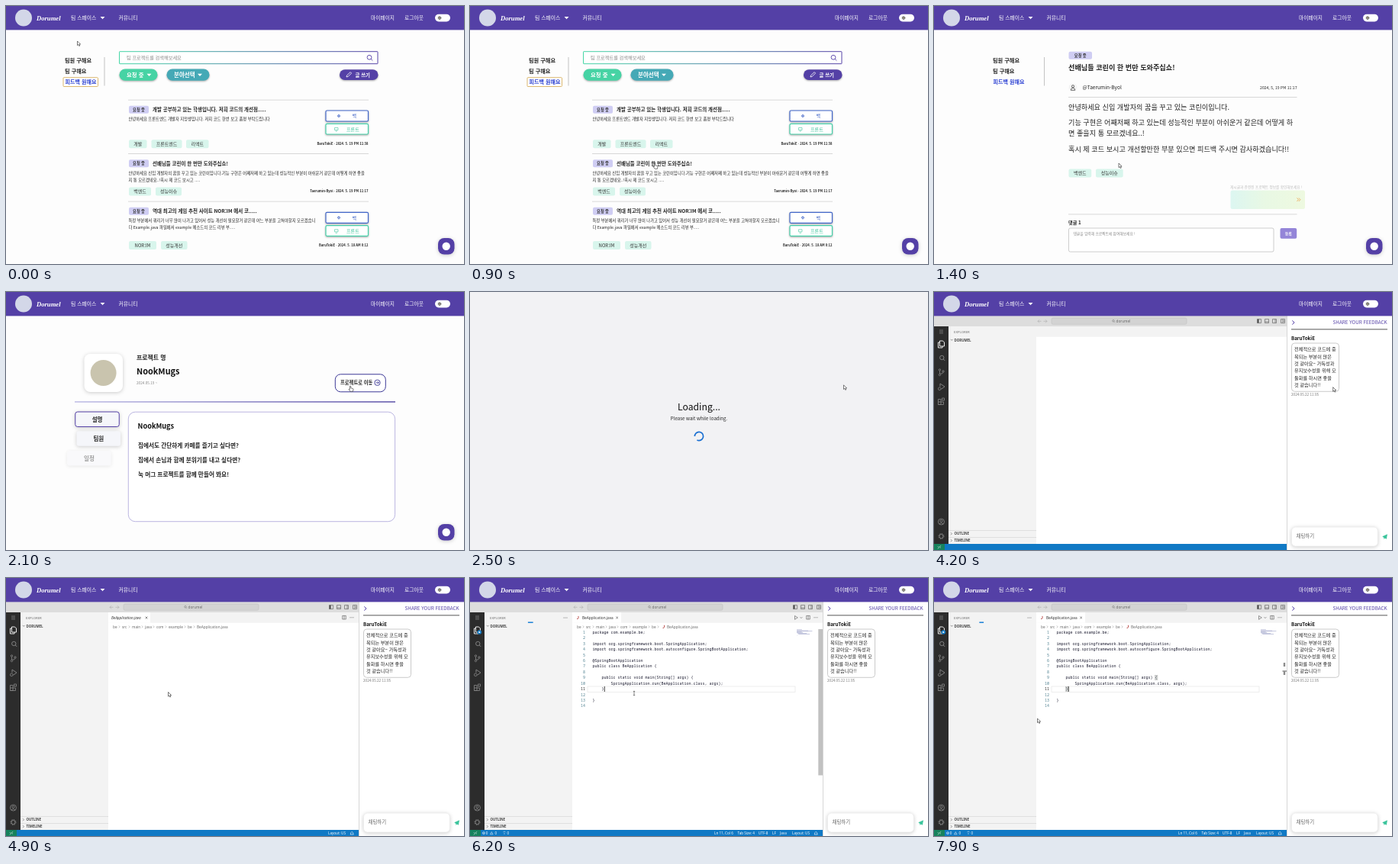
These frames come from a looping animation (600 by 338 pixels, 8 s). An HTML page:

```html
<!DOCTYPE html>
<html lang="ko">
<head>
<meta charset="utf-8">
<title>Dorumel</title>
<style>
html, body { margin: 0; width: 100%; height: 100%; overflow: hidden; background: #fff; }
svg { display: block; width: 100vw; height: 100vh; font-family: "Noto Sans CJK KR", "Noto Sans CJK", "Noto Sans", sans-serif; }
text { white-space: pre; }
.b { font-weight: 700; }
.e { text-anchor: end; }
.c { text-anchor: middle; }
.ui { font-family: "Noto Sans", "Noto Sans CJK KR", sans-serif; }
.code { font-family: "Noto Sans Mono", "DejaVu Sans Mono", monospace; }
.mark { font: italic 700 8.6px "Liberation Serif", serif; }
.sh { filter: drop-shadow(.7px 1.2px .9px #0005); }
.soft { filter: drop-shadow(0 1.5px 2.5px #0003); }
</style>
</head>
<body>
<svg viewBox="0 0 600 338" preserveAspectRatio="none">
  <defs>
    <linearGradient id="search"><stop stop-color="#45d6a6"/><stop offset="1" stop-color="#5440a6"/></linearGradient>
    <linearGradient id="rule" gradientUnits="userSpaceOnUse" x1="90" x2="510"><stop stop-color="#b4b2e2"/><stop offset="1" stop-color="#43379b"/></linearGradient>
    <linearGradient id="card"><stop stop-color="#dcf6f1"/><stop offset=".45" stop-color="#e8f8e4"/><stop offset="1" stop-color="#eef9e0"/></linearGradient>
  </defs>
  <g id="stage"></g>
</svg>
<script>
const PURPLE = '#5440a6', INK = '#222', LOOP = 8000;
const $ = id => document.getElementById(id);

// drawing helpers
const box = (x, y, w, h, fill, more = '') => `<rect x="${x}" y="${y}" width="${w}" height="${h}" fill="${fill}" ${more}/>`;
const frame = (x, y, w, h, r, stroke, width = 1, fill = '#fff', more = '') =>
  box(x, y, w, h, fill, `rx="${r}" stroke="${stroke}" stroke-width="${width}" ${more}`);
const text = (x, y, size, str, fill = INK, cls = '') =>
  `<text x="${x}" y="${y}" font-size="${size}" fill="${fill}" class="${cls}">${str}</text>`;
const path = (d, stroke, width = .7, fill = 'none', more = '') =>
  `<path d="${d}" stroke="${stroke}" stroke-width="${width}" fill="${fill}" ${more}/>`;
const dot = (x, y, r, fill, stroke = 'none', width = 1) =>
  `<circle cx="${x}" cy="${y}" r="${r}" fill="${fill}" stroke="${stroke}" stroke-width="${width}"/>`;
const group = (id, body, more = '') => `<g id="${id}" ${more}>${body}</g>`;
const caret = (x, y, w = 6) => path(`M${x} ${y}h${w}l${-w / 2} 3.2z`, 'none', 0, '#fff');
const lens = (x, y, r, color, w = .7) => dot(x, y, r, 'none', color, w) + path(`M${x + r * .7} ${y + r * .7}l${r * .8} ${r * .8}`, color, w);
const gear = (x, y, r, color, w) => dot(x, y, r, 'none', color, w) +
  `<circle cx="${x}" cy="${y}" r="${r * 1.35}" fill="none" stroke="${color}" stroke-width="${w}" stroke-dasharray="${r * .53}"/>`;

const header = box(0, 0, 600, 31.4, PURPLE) + dot(23, 15.5, 11, '#d3d7e8') +
  '<text x="40" y="19" class="mark" fill="#fff">Dorumel</text>' +
  text(85, 18, 6.85, '팀 스페이스', '#fff') + caret(123.5, 14, 6) +
  text(147.5, 18, 6.8, '커뮤니티', '#fff') + text(478, 18, 6.75, '마이페이지', '#fff') +
  text(522, 18, 6.8, '로그아웃', '#fff') +
  box(562, 10.8, 20, 9.6, '#fff', 'rx="4.8"') + gear(568, 15.6, 1.5, '#444', .8) + dot(568, 15.6, 1, '#8a8160');

const chatButton = box(566, 304, 21.5, 21.5, PURPLE, 'rx="8" class="soft"') + dot(576.7, 314.7, 5.2, '#fff');

const side = (lineX, extra) => text(77, 74, 7.2, '팀원 구해요', INK, 'b') + text(77, 88, 7.2, '팀 구해요', INK, 'b') +
  extra + text(77.5, 102, 7.05, '피드백 원해요', '#2a3fd2', 'b') + box(lineX, 67, .8, 37.5, '#b4b4b4');

const badge = (x, y, w) => box(x, y, w, 10, '#cfcdf3', 'rx="2"') + text(x + w / 2, y + 6.9, 5.2, '요청 중', '#333', 'c b');
const tag = (x, y, w, str) => box(x, y, w, 11, '#d8f5ec', 'rx="2"') + text(x + w / 2, y + 7.6, 6, str, '#333', 'c');
const pill = (x, y, w, h, color) => box(x, y, w, h, color, `rx="${h / 2}" class="sh"`);

const roles = y => frame(419, y, 55.5, 14, 1.5, '#4166c9', 1.2, '#fff', 'class="sh"') +
  gear(436, y + 7, 1.2, '#3a5fc4', .8) + text(453.5, y + 9.3, 6, '백', '#3a5fc4') +
  frame(419, y + 17.4, 55.5, 13.6, 1.5, '#45cfa8', 1.2, '#fff', 'class="sh"') +
  path(`M430.5 ${y + 22.5}h4.5v3h-4.5zM431.5 ${y + 27}h2.5`, '#3cc49c', .6) + text(446, y + 26.5, 6.1, '프론트', '#3cc49c');

const post = (y, title, body, tagY, tags, by) => box(160, y - 13, 315, .8, '#cfcfcf') + badge(161, y - 5, 26) +
  text(192, y + 2.4, 6.48, title, INK, 'b') +
  body.map((s, i) => text(160.5, y + 14.6 + i * 8.7, 5.3, s)).join('') +
  tags.map(([x, w, s]) => tag(x, tagY, w, s)).join('') + text(474.5, tagY + 6.6, 4.2, by, INK, 'e b');

const listPage = side(128.6, frame(75, 93.7, 45.5, 11.8, 1, '#d8b060', .9)) +
  frame(148.5, 59.7, 338.5, 16, .5, 'url(#search)') + text(158, 70.2, 6.2, '팀 프로젝트를 검색해보세요', '#8a8a8a') +
  lens(476, 67.3, 2.9, PURPLE, .9) +
  pill(148.5, 82.5, 50, 15.3, '#46d3a4') + text(158, 92.8, 7.4, '요청 중', '#fff', 'b') + caret(184.5, 88.7) +
  pill(210.5, 82.5, 56, 15.3, '#45a9b6') + text(220, 92.8, 7.5, '분야선택', '#fff', 'b') + caret(251, 88.7) +
  pill(437, 83.3, 50.5, 13.8, PURPLE) + text(457.5, 92.5, 6.4, '글 쓰기', '#fff', 'b') +
  path('M446 93l.6-2.2 4.6-4.2 1.5 1.5-4.6 4.3z', '#fff', .8) +
  post(135.7, '개발 공부하고 있는 학생입니다. 저희 코드의 개선점.....',
    ['안녕하세요 프론트엔드 개발자 지망생입니다. 저희 코드 한번 보고 품평 부탁드립니다'],
    175.3, [[161, 23.5, '개발'], [190.5, 40, '프론트엔드'], [236, 29.5, '리액트']], 'BaruTokiE · 2024. 5. 19 PM 11:38') +
  roles(137) +
  post(206.2, '선배님들 코린이 한 번만 도와주십쇼!',
    ['안녕하세요 신입 개발자의 꿈을 꾸고 있는 코린이입니다.기능 구현은 어째저째 하고 있는데 성능적인 부분이 아쉬운거 같은데 어떻게 하면 좋을',
     '지 통 모르겠네요..!혹시 제 코드 보시고 .....'],
    237.6, [[161, 29, '백엔드'], [196, 34, '성능이슈']], 'Taerumin-Byol · 2024. 5. 19 PM 11:17') +
  post(268.7, '역대 최고의 게임 추천 사이트 NOR:IM 에서 코.....',
    ['특정 부분에서 쿼리가 너무 많이 나가고 있어서 성능 개선이 필요할거 같은데 어느 부분을 고쳐야할지 모르겠습니',
     '다 Example.java 파일에서 example 메소드의 코드 리뷰 부.....'],
    308, [[161, 36, 'NOR:IM'], [203, 34.5, '성능개선']], 'BaruTokiE · 2024. 5. 18 AM 0:12') +
  roles(270.3);

const detailPage = side(144, '') + badge(176.5, 59.7, 30.5) +
  text(176, 83.7, 9.15, '선배님들 코린이 한 번만 도와주십쇼!', INK, 'b') +
  dot(182, 107, 5.5, '#f4f4f4') + dot(182, 105.3, 1.6, 'none', '#333', .7) + path('M179.3 110.3c0-4 5.4-4 5.4 0z', '#333') +
  text(194.5, 109.2, 6.6, '@Taerumin-Byol') + text(475.5, 108.7, 5.1, '2024, 5, 19 PM 11:17', INK, 'e') +
  box(176, 119, 299.5, .8, '#cfcfcf') +
  text(176, 135.8, 9.15, '안녕하세요 신입 개발자의 꿈을 꾸고 있는 코린이입니다.') +
  text(176, 156.3, 9.15, '기능 구현은 어째저째 하고 있는데 성능적인 부분이 아쉬운거 같은데 어떻게 하') +
  text(176, 170.3, 9.15, '면 좋을지 통 모르겠네요..!') +
  text(176, 190.8, 9.15, '혹시 제 코드 보시고 개선할만한 부분 있으면 피드백 주시면 감사하겠습니다!!') +
  tag(176.5, 213.4, 29.7, '백엔드') + tag(212, 213.4, 35.7, '성능이슈') +
  text(388, 238.8, 4.7, '게시글과 관련된 프로젝트 정보를 확인해보세요 !', '#bdbdbd') +
  box(388.5, 241.5, 97.5, 24.5, 'url(#card)', 'rx="2.5"') + path('M475.5 251.5l2 2.2-2 2.2m2.4-4.4l2 2.2-2 2.2', '#eaa04a', .8) +
  box(176, 272.5, 299.5, .8, '#cfcfcf') + text(176, 286.2, 6.2, '댓글 1', INK, 'b') +
  frame(176.5, 291, 268.5, 31, 2, '#b8b8b8', .7) + text(182.5, 299.6, 4.75, '댓글을 입력해 프로젝트에 참여해보세요 !', '#888') +
  box(453.5, 291, 21.7, 13.7, '#9485d8', 'rx="2"') + text(464.3, 299.7, 5, '등록', '#fff', 'c b');

const tabs = [[90.5, 157, '설명'], [90.5, 182.3, '팀원'], [90.5, 208, '일정']].map(([x, y, s], i) =>
  group('tab' + i, frame(x, y, 57.5, 19.5, 3, i ? 'none' : PURPLE, 1, '#f5f6fa', 'class="soft"') +
    text(x + 28.8, y + 12.6, 7.5, s, INK, 'c b'))).join('');

const projectPage = frame(102.5, 81, 50.5, 50, 8, 'none', 0, '#fff', 'class="soft"') + dot(127.6, 106, 17, '#c9c4ae') +
  text(171, 89.3, 7.9, '프로젝트 명', INK, 'b') + text(171, 108.2, 10.9, 'NookMugs', '#111', 'b') +
  text(171, 121.2, 4.7, '2024.05.19 ~', '#888') +
  frame(431.3, 107.8, 66, 23, 7, '#3b3796', 1) + text(438, 121.4, 6.3, '프로젝트로 이동', INK, 'b') +
  dot(486.5, 118.8, 3.7, 'none', '#3b3796', .9) + path('M484.5 118.8h4m-1.7-1.7l1.7 1.7-1.7 1.7', '#3b3796', .8) +
  box(90, 143.3, 420, 1.3, 'url(#rule)') + tabs +
  frame(160.3, 157.2, 349.3, 143.5, 9, '#aaa4da', .8) + text(172.5, 179.3, 9.2, 'NookMugs', '#111', 'b') +
  ['집에서도 간단하게 카페를 즐기고 싶다면?', '집에서 손님과 함께 분위기를 내고 싶다면?', '눅 머그 프로젝트를 함께 만들어 봐요!']
    .map((s, i) => text(173, 204 + i * 18.8, 7.65, s, INK, 'b')).join('');

const loadingPage = box(0, 0, 600, 338, '#f2f2f4') + text(300, 155, 12.2, 'Loading...', '#111', 'c') +
  text(300, 168, 6.1, 'Please wait while loading.', INK, 'c') +
  group('spinner', '<circle r="5.6" fill="none" stroke="#1b70d2" stroke-width="1.7" stroke-dasharray="28.5 6.7"/>');

// editor
const GRAY = '#6b6b6b', DIM = '#8a8a8a';
const ui = (x, y, size, str, fill = GRAY, cls = '') => text(x, y, size, str, fill, 'ui ' + cls);
const crumbs = (x, icon) => [[140, 'be'], [152, 'src'], [165, 'main'], [182, 'java'], [197, 'com'], [213, 'example'], [238, 'be']]
  .map(([cx, s], i, all) => ui(cx, 65.6, 4.74, s) + path(`M${(all[i + 1] || [250])[0] - 4.2} 62.4l1.4 1.5-1.4 1.5`, DIM, .5)).join('') +
  (icon ? javaIcon(252, 65.6) : '') + ui(x, 65.6, 4.74, 'BeApplication.java');
const javaIcon = (x, y) => path(`M${x + 2.5} ${y - 3.8}v2.6q0 1.2-2 1`, '#b5423f', .9);
const cross = (x, y) => path(`M${x - 1.4} ${y - 1.4}l2.8 2.8m0-2.8l-2.8 2.8`, '#444', .6);
const section = (y, s) => box(19, y, 115, .6, '#d2d2d2') + path(`M22 ${y + 2.9}l1.5 1.5-1.5 1.5`, '#555', .6) + ui(26.5, y + 6.1, 4.4, s, '#444', 'b');
const layoutIcon = (x, part) => path(`M${x - 2.5} 35.6h5v5h-5z`, '#555', .6) + part;

const shell = box(0, 31, 462, 307, '#fff') + box(0, 31, 462, 14, '#dddddd') +
  path('M138 36.3l-2 2 2 2m-2-2h4.5M146 36.3l2 2-2 2m2-2h-4.5', '#aaa', .6) +
  frame(154, 34, 177, 8.3, 2, '#c2c2c2', .6, '#d3d3d3') + lens(235, 37.8, 1.3, GRAY, .5) + ui(238.5, 40.2, 4.7, 'dorumel') +
  layoutIcon(426, box(423.5, 35.6, 2.2, 5, '#555')) + layoutIcon(436, path('M433.5 39h5', '#555', .6)) +
  layoutIcon(446, path('M447 35.6v5', '#555', .6)) + layoutIcon(457, path('M457 35.6v5m0-2.5h2.5', '#555', .6)) +
  box(0, 45, 19, 285, '#2c2c2c') + path('M7 50h5m-5 2h5m-5 2h5', '#999', .6) +
  path('M7.5 64h4l2 2v5h-6zM7.5 66h-2v7h5.5v-2', '#fff', .9) + lens(10.3, 86, 2.7, DIM, .9) +
  dot(7.5, 102, 1.2, 'none', DIM, .8) + dot(7.5, 108.5, 1.2, 'none', DIM, .8) + dot(12, 104, 1.2, 'none', DIM, .8) +
  path('M7.5 103.2v4m4.5-2q0 2-4 2', DIM, .8) +
  path('M8 124v-4l6 4-4.5 3.2', DIM, .9) + dot(7.3, 126.8, 1.8, 'none', DIM, .8) +
  path('M5.5 140.5h3.5v7h-3.5zM5.5 144h7v3.5h-7M10.5 139h3v3h-3z', DIM, .8) +
  dot(9.5, 301, 4, 'none', DIM, .8) + dot(9.5, 300, 1.5, 'none', DIM, .8) + path('M7 304q2.5-3 5 0', DIM, .8) + gear(9.5, 320, 2.6, DIM, .9) +
  box(19, 45, 115, 285, '#f3f3f3') + ui(26, 53.6, 4.3, 'EXPLORER') +
  path('M21.8 61.9l1.5 1.5 1.5-1.5', '#555', .6) + ui(26.5, 65, 4.4, 'DORUMEL', '#444', 'b') +
  section(312.3, 'OUTLINE') + section(321.2, 'TIMELINE') + box(134, 45, 328, 13.7, '#f3f3f3') +
  box(0, 330, 462, 8, '#1079c5') + box(0, 330, 14, 8, '#16825d') + path('M5 333.2l1.6 1.6-1.6 1.6m4-4.2l-1.6 1.6 1.6 1.6', '#fff', .6);

const tools = path('M440.7 49.4h4.6v4.6h-4.6zM443 49.4v4.6', '#555', .6) + [451, 453, 455].map(x => dot(x, 51.8, .5, '#555')).join('');
const layoutStatus = ui(422, 335.9, 4.6, 'Layout: US', '#fff') + path('M451 336h4.4l-.7-1v-1.2q-1.5-3-3 0v1.2z', '#fff', .6);

const preview = box(134, 45, 55, 13.7, '#fff') +
  `<g font-style="italic">${ui(138, 53.7, 4.74, 'BeApplication.java', '#333')}</g>` + cross(184, 52) + crumbs(250, false);

const lineY = n => 72.9 + (n - 1) * 7.42;
const source = { 1: 'package com.example.be;', 3: 'import org.springframework.boot.SpringApplication;',
  4: 'import org.springframework.boot.autoconfigure.SpringBootApplication;', 6: '@SpringBootApplication',
  7: 'public class BeApplication {', 9: '    public static void main(String[] args) {',
  10: '        SpringApplication.run(BeApplication.class, args);', 11: '    }', 13: '}' };
const codeText = (x, y, s, fill, cls = '') => text(x, y, 5, s, fill, 'code ' + cls);
const codeLines = Object.entries(source).map(([n, s]) => {
  const body = s.trimStart();
  return codeText(160.5 + (s.length - body.length) * 3, lineY(n), body, '#1c1c30');
}).join('');
const numbers = Array.from({ length: 14 }, (_, i) => codeText(151, lineY(i + 1), i + 1, i == 10 ? '#222' : '#4d7f8f', 'e')).join('');
const minimap = Object.entries(source).map(([n, s]) => {
  const body = s.trimStart();
  return box(428 + (s.length - body.length) * .3, 67 + n * .62, body.length * .3, .45, '#8086b8');
}).join('');

const opened = box(134, 45, 64, 13.7, '#fff') + javaIcon(139.5, 53.7) + ui(147, 53.7, 4.74, 'BeApplication.java', '#333') + cross(192.6, 52) +
  path('M425.5 49.5l3.8 2.4-3.8 2.4zM432.5 51.2l1.4 1.4 1.4-1.4', '#555', .6) + crumbs(258, true) +
  [123, 125, 127].map(x => dot(x, 52, .5, '#555')).join('') + dot(12.3, 71, 2.8, '#1079c5') + dot(12.3, 71, 1.1, '#fff') +
  frame(154, 142, 272, 7.4, 0, '#e6e6e6', .7, 'none') + numbers +
  group('brackets', frame(289.6, lineY(9) - 4.6, 3.3, 6, 0, '#aaa', .5, '#e4e9e4') + frame(172.6, lineY(11) - 4.6, 3.3, 6, 0, '#aaa', .5, '#e4e9e4') +
    box(457.8, 111, 2.4, 5, '#8c8c8c') + box(456.5, 121.5, 5.5, 1, '#555') + box(457.8, 122, 2.4, 5, '#8c8c8c')) +
  codeLines + minimap + group('scrollbar', box(456.3, 67, 5.7, 191.5, '#c1c1c1')) + group('textCaret', box(175.8, 142, .8, 7, '#111')) +
  group('progress', box(-1.15, 57.5, 2.3, 1.4, '#0a78d4')) +
  dot(18, 334.2, 1.6, 'none', '#fff', .5) + path('M17.3 333.5l1.4 1.4m0-1.4l-1.4 1.4M26.5 335.8l1.8-3.2 1.8 3.2zM45 336v-2m-1.5-1.2q1.5-1.4 3 0', '#fff', .5) +
  [[20.7, '0'], [32.5, '0'], [48.5, '0'], [320, 'Ln 11, Col 6'], [350.5, 'Tab Size: 4'], [378, 'UTF-8'], [396, 'LF'], [406, 'Java']]
    .map(([x, s]) => ui(x, 335.9, 4.6, s, '#fff')).join('');

const feedback = box(462, 31, 138, 307, '#fff') + box(462, 31, .8, 307, '#ccc') + path('M469.4 37.3l2.6 2.7-2.6 2.7', PURPLE, 1) +
  text(593.7, 42.4, 6.3, 'SHARE YOUR FEEDBACK', PURPLE, 'e') + box(468, 48.4, 126, 1, '#555') +
  text(468, 63, 6.2, 'BaruTokiE', '#111', 'b') + frame(468.5, 67, 62, 63.3, 4, '#bdbdbd', .8) +
  ['전체적으로 코드에 중', '복되는 부분이 많은', '것 같아요~ 가독성과', '유지보수성을 위해 모', '듈화를 하시면 좋을', '것 같습니다!!']
    .map((s, i) => text(472, 77.3 + i * 9.35, 6.2, s)).join('') + text(468, 136.2, 4.65, '2024.05.22 11:05', '#777') +
  frame(468.5, 308, 112.8, 25, 5, '#ececec', .8, '#fff', 'class="soft"') + text(474.5, 321.7, 6.4, '채팅하기', '#666') +
  path('M587.3 320.3l6.7-3-1.2 6.4-2-1.2-1.4 1.4v-2z', 'none', 0, '#3cc49c');

const pointers = group('arrow', path('M0 0v5.6l1.3-1.1 1 2 1-.5-.9-1.9h1.7z', '#222', .6, '#fff')) +
  group('hand', path('M-.6 4V.4q.7-.9 1.4 0v2.4l2.6.7q.8.3.6 1.2l-.6 2.6H.2L-2 4.7q.2-1 1.4-.2z', '#222', .6, '#fff')) +
  group('beam', path('M-1.2-2.6h2.4m-1.2 0v5.2m-1.2 0h2.4', '#333', .6));

$('stage').innerHTML = box(0, 0, 600, 338, '#fdfdfd') +
  group('list', listPage) + group('detail', detailPage) + group('project', projectPage) + group('chat', chatButton) +
  group('ide', shell + group('editor', tools + layoutStatus + group('preview', preview) + group('opened', opened)) + feedback) +
  group('top', header) + group('loading', loadingPage) + group('pointer', pointers);

// timeline
const show = (id, on) => { $(id).style.display = on ? '' : 'none'; };
const move = (id, value) => $(id).setAttribute('transform', value);
const clamp = v => Math.max(0, Math.min(1, v));
const backOut = p => 1 + 2.7 * (p - 1) ** 3 + 1.7 * (p - 1) ** 2;
const smooth = p => p * p * (3 - 2 * p);

// pointer stops: time, x, y
const stops = [[0, 93.5, 46], [900, 242, 206], [1400, 242, 206], [1800, 442, 252], [2100, 451, 123], [2400, 451, 123],
  [2700, 599.4, 118.5], [4000, 599.4, 118.5], [4700, 212.5, 149.5], [5200, 212.5, 149.5], [5600, 215, 151], [7200, 215, 151], [7900, 135.5, 184], [8000, 135.5, 184]];
function pointerAt(t) {
  const i = stops.findIndex(s => s[0] > t);
  const [t0, x0, y0] = stops[i - 1], [t1, x1, y1] = stops[i], p = smooth((t - t0) / (t1 - t0));
  return [x0 + (x1 - x0) * p, y0 + (y1 - y0) * p];
}

function draw(t) {
  const loading = t >= 2400 && t < 4000, ide = t >= 4000, code = t >= 5400;
  show('list', t < 1000);
  show('detail', t >= 1000 && t < 1900);
  show('project', t >= 1900 && t < 2400);
  show('chat', t < 2400);
  show('loading', loading);
  show('ide', ide);
  show('editor', t >= 4500);
  show('preview', !code);
  show('opened', code);
  show('brackets', t >= 7300);
  show('scrollbar', t < 7900);
  show('textCaret', (t - 5180) % 500 < 250);

  for (let i = 0; i < 3; i++) {
    const p = clamp((t - 1900 - i * 85) / 220);
    move('tab' + i, `translate(${22 * (backOut(p) - 1)})`);
    $('tab' + i).style.opacity = clamp(p * 3.2);
  }
  move('spinner', `translate(300 189) rotate(${(t - 3600) * .36 + 215})`);

  const p = (t + 840) % 2000 / 2000;
  move('progress', `translate(${20.15 + 113.7 * p}) scale(${3 - 4 * Math.abs(p - .5)} 1)`);

  const [x, y] = pointerAt(t);
  const hand = t >= 700 && t < 1000 || t >= 1700 && t < 2400, beam = code && t < 7900;
  move('pointer', `translate(${x} ${y})`);
  show('hand', hand);
  show('beam', beam);
  show('arrow', !hand && !beam);
}

const start = performance.now();
function tick() {
  const t = (performance.now() - start) % LOOP;
  draw(Math.floor(t / 100) * 100);
  requestAnimationFrame(tick);
}
tick();
</script>
</body>
</html>
```
